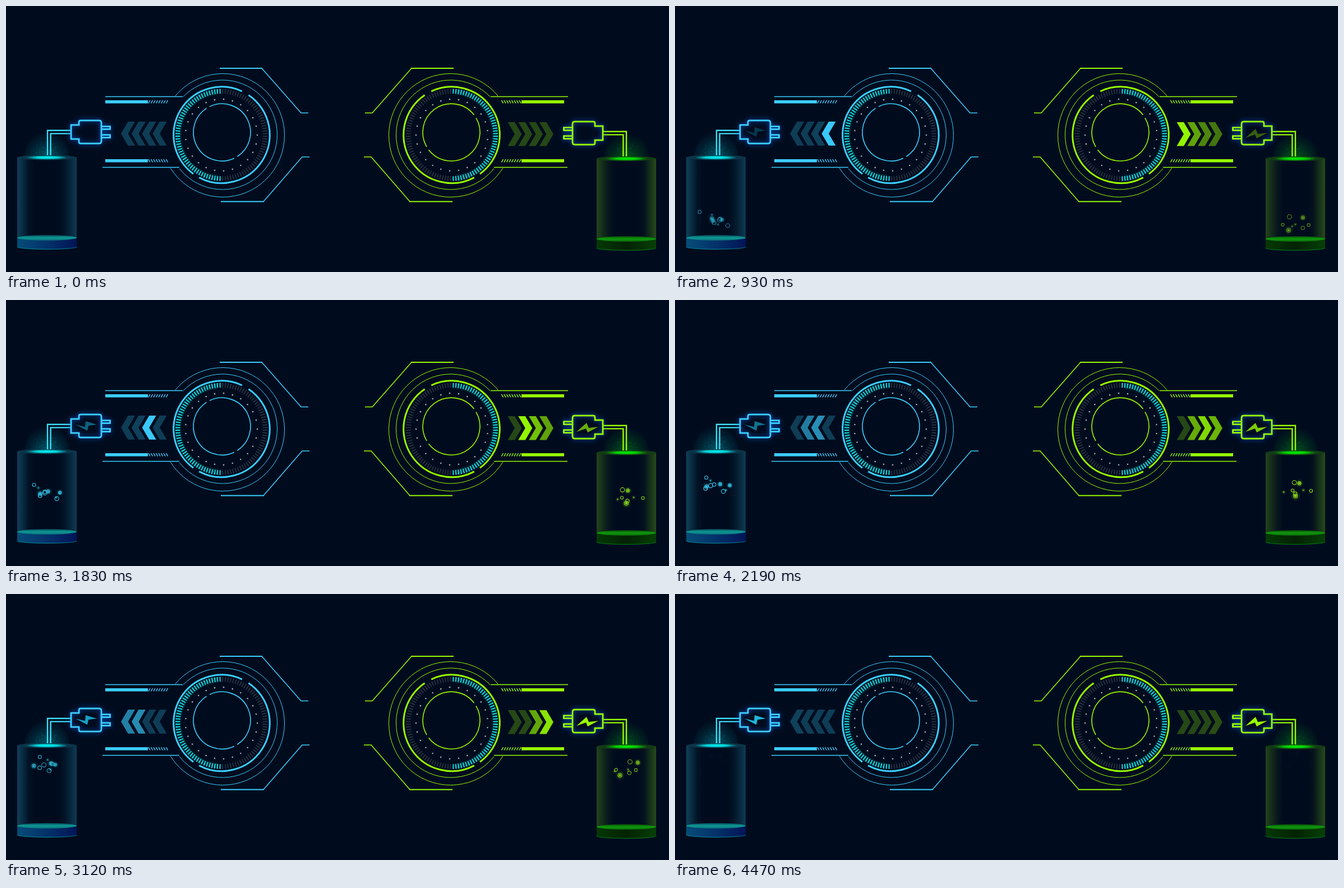
These frames come from a looping animation (1182 by 474 pixels, 4500 ms). An HTML page with a canvas:

```html
<!DOCTYPE html>
<html>
<head>
<meta charset="utf-8">
<style>
html, body { margin: 0; width: 1182px; height: 474px; overflow: hidden; background: #000c1e; }
canvas { position: absolute; left: 0; top: 0; }
</style>
</head>
<body>
<canvas id="back" width="1182" height="474"></canvas>
<canvas id="front" width="1182" height="474"></canvas>
<script>
const LOOP = 4500, STEP = LOOP / 5, TAU = Math.PI * 2, RAD = Math.PI / 180;
const back = document.getElementById('back').getContext('2d');
const front = document.getElementById('front').getContext('2d');

// Both sides are drawn in left-hand coordinates; `mirror` flips the right one
const left = {
  main: '#3cceff', cable: '#3fdcf5', bolt: '#1cb6dc', bubble: '#3cc4ec', glow: '30,200,200',
  gapTurn: -119, barX: 177, lowX: 172, wall: '26,104,134', rim: '#0b3549',
  spot: '0,240,240', spray: '0,175,185', bubbles: 10, bubbleY: 0,
  surface: ['#08495c', '#0d9a94', '#0b6f7c'], liquid: ['#064c78', '#04326a', '#021457'],
  boltShape: 'M124 222L145 233L147 224L162 222L142 216L141 226Z'
};
const right = {
  main: '#98fb00', cable: '#98fb00', bolt: '#98fb00', bubble: '#8ee01c', glow: '130,200,20',
  gapTurn: -146, barX: 184, lowX: 178, wall: '66,122,24', rim: '#123c14',
  spot: '0,235,0', spray: '0,165,30', bubbles: 8, bubbleY: 8, mirror: true,
  surface: ['#0a4a0a', '#0f9a0c', '#0b6a0c'], liquid: ['#064006', '#042204', '#053805'],
  boltShape: 'M163 233L145 217L141 226L124 224L143 234L146 227Z'
};

function place(c, side, width = 1179, dy = 0) {
  if (side.mirror) c.setTransform(-1, 0, 0, 1, width, dy);
  else c.setTransform(1, 0, 0, 1, 0, 0);
}

function randomFrom(seed) {
  return () => (seed = seed * 16807 % 2147483647) / 2147483647;
}

function stroke(c, path, color, width) {
  c.strokeStyle = color;
  c.lineWidth = width;
  c.stroke(new Path2D(path));
}

function arc(c, x, y, r, from, to, color, width) {
  c.beginPath();
  c.arc(x, y, r, from * RAD, to * RAD);
  c.strokeStyle = color;
  c.lineWidth = width;
  c.stroke();
}

function ellipse(c, x, y, rx, ry, fill) {
  c.beginPath();
  c.ellipse(x, y, rx, ry, 0, 0, TAU);
  c.fillStyle = fill;
  c.fill();
}

function ramp(gradient, colors) {
  colors.forEach((color, i) => gradient.addColorStop(i / (colors.length - 1), color));
  return gradient;
}

const shades = (rgb, ...alphas) => alphas.map(a => `rgba(${rgb},${a})`);

function drawDial(c, side) {
  const { main, gapTurn, barX, lowX } = side;
  stroke(c, 'M456 111L526 190.5H539M459 348.5L528 269H541', main, 1.5);
  stroke(c, 'M381 111H457M383 348.5H460', main, 2);

  arc(c, 386.5, 230.5, 110, -140.5, 148, main, 1);
  arc(c, 386, 229.5, 97.5, -136, 142, main, 1);
  arc(c, 384.5, 229.8, 85.8, -56, 118, main, 3);
  arc(c, 384.5, 229.8, 85.8, 126, 295, main, 3);
  arc(c, 384, 229.7, 77, 95, 265, 'rgba(0,80,80,.3)', 11);

  const ticks = 104, dots = 25;
  for (let i = 0; i < ticks; i++) {
    const turn = (i + .5) * 360 / ticks - 90, lit = i >= ticks / 2;
    const half = lit ? .75 : .55;
    arc(c, 384, 229.7, 77.8, turn - half, turn + half, lit ? '#14dbe6' : '#303a46', 8.5);
  }
  for (let i = 0; i < dots; i++) {
    const a = i / dots * TAU - 86.4 * RAD;
    ellipse(c, 384 + Math.cos(a) * 64, 230 + Math.sin(a) * 64, 1.3, 1.3, '#a4abb2');
  }

  for (const turn of [gapTurn, gapTurn + 180]) {
    arc(c, 385, 225.2, 51, turn + 3.5, turn + 176.5, main, 1.6);
  }

  stroke(c, `M177 161.5H315M${lowX} 287.5H309`, main, 1.4);
  for (const [y, lean] of [[168, 3], [273, -3]]) {
    stroke(c, `M${barX} ${y + 2.7}h76`, main, 5.4);
    for (let i = 0; i < 8; i++) {
      stroke(c, `M${barX + 78.5 + i * 4.5 - lean / 2} ${y + 5.4}l${lean} -5.4`, main, 1.5);
    }
  }
}

function drawTank(c, side) {
  const x = 20, w = 106, mid = 73, top = 270, level = 413, floor = 429;
  const across = () => c.createLinearGradient(x, 0, x + w, 0);

  c.fillStyle = ramp(across(), shades(side.wall, .58, .32, .06, 0, 0, 0, 0, 0, .1, .3, .52));
  c.fillRect(x, top, w, floor - top);

  c.beginPath();
  c.moveTo(x, level);
  c.ellipse(mid, floor, 53, 4.5, 0, Math.PI, 0, true);
  c.lineTo(x + w, level);
  c.fillStyle = ramp(across(), side.liquid);
  c.fill();
  c.beginPath();
  c.ellipse(mid, floor, 53, 4.5, 0, 0, Math.PI);
  c.strokeStyle = `rgba(${side.spray},.55)`;
  c.lineWidth = 1.3;
  c.stroke();
  ellipse(c, mid, level, 53, 4.8, ramp(c.createLinearGradient(0, level - 5, 0, level + 5), side.surface));

  // Dome of light with fine specks above the lid
  const domeLight = c.createRadialGradient(mid, top, 0, mid, top, 46);
  c.beginPath();
  c.ellipse(mid, top, 40, 46, 0, Math.PI, 0);
  c.fillStyle = ramp(domeLight, shades(side.spray, .5, .28, .12, 0));
  c.fill();
  const random = randomFrom(7);
  for (let i = 0; i < 90; i++) {
    const a = Math.PI * (1 + random()), r = 8 + 34 * random();
    c.fillStyle = `rgba(${side.spray},${.7 - r / 75})`;
    c.fillRect(mid + Math.cos(a) * r * .85, top + Math.sin(a) * r, 1, 1);
  }

  ellipse(c, mid, top, 53, 4.5, side.rim);
  c.save();
  c.translate(mid, top);
  c.scale(1, .1);
  ellipse(c, 0, 0, 38, 38, ramp(c.createRadialGradient(0, 0, 0, 0, 0, 38), shades(side.spot, 1, .85, 0)));
  c.restore();
}

function drawPlug(c, side) {
  const body = 'M116 212H130V207Q130 204 133 204H166Q170 204 170 208V241Q170 245 166 245H133Q130 245 130 242V237H116Z' +
    'M170 214.8H185.5V219.4H170M170 229.8H185.5V234.4H170';
  stroke(c, 'M74 266V221.8H116M79.6 266V227.4H116', side.cable, 2.4);
  c.save();
  c.shadowColor = '#0868ff';
  c.shadowBlur = 9;
  stroke(c, body, side.main, 2.5);
  c.restore();
  stroke(c, body, side.main, 2.5);
}

for (const side of [left, right]) {
  place(back, side);
  drawDial(back, side);
  place(back, side, 1179, 2);
  drawTank(back, side);
  place(back, side, 1180, 2);
  drawPlug(back, side);
}

// Bubbles rise together, slowing near the lid, while each one sways sideways
function drawBubbles(c, side, t) {
  const random = randomFrom(side.bubbles * 1301);
  const rise = 422 + side.bubbleY - 135 * Math.sin(t / LOOP * Math.PI / 2);
  for (let i = 0; i < side.bubbles; i++) {
    const home = 52 + 40 * (i + random()) / side.bubbles;
    const sway = 9 * Math.sin(TAU * (t / LOOP * (1 + random()) + random()));
    const x = home + sway, y = rise + 26 * (random() - .5);
    const kind = i % 4, r = kind === 3 ? 1.6 : 2.6 + 1.3 * random();

    if (kind % 2) {
      const glow = c.createRadialGradient(x, y, 0, x, y, r * 2.5);
      ellipse(c, x, y, r * 2.5, r * 2.5, ramp(glow, shades(side.glow, .5, 0)));
    }
    if (kind < 3) arc(c, x, y, r, 0, 360, side.bubble, 1.1);
    if (kind % 2) ellipse(c, x, y, r * .6, r * .6, side.bubble);
  }
}

const clamp = v => Math.max(0, Math.min(1, v));

// Left arrows light up one step before their peak, right arrows from the start
function drawChevrons(c, side, t) {
  for (let i = 0; i < 4; i++) {
    const peak = (i + 1) * STEP, rise = side.mirror ? peak : STEP;
    const light = clamp(t < peak ? 1 - (peak - t) / rise : 1 - (t - peak) / STEP);
    c.globalAlpha = .25 + .75 * light;
    c.fillStyle = side.main;
    c.fill(new Path2D(`M${261.5 - i * 18.8} 227.4l12.5 -21.3h12.5l-12.5 21.3l12.5 21.3h-12.5z`));
  }
}

function draw(now) {
  const t = now % LOOP, c = front;
  c.setTransform(1, 0, 0, 1, 0, 0);
  c.clearRect(0, 0, 1182, 474);
  for (const side of [left, right]) {
    place(c, side, 1181, .8);
    drawChevrons(c, side, t);

    place(c, side, 1180, 2);
    c.globalAlpha = clamp(t / STEP / (side.mirror ? 3 : 4));
    c.fillStyle = side.bolt;
    c.fill(new Path2D(side.boltShape));

    place(c, side);
    c.globalAlpha = Math.sin(t / LOOP * Math.PI);
    drawBubbles(c, side, t);
    c.globalAlpha = 1;
  }
  requestAnimationFrame(() => draw(performance.now()));
}
draw(0);
</script>
</body>
</html>
```
